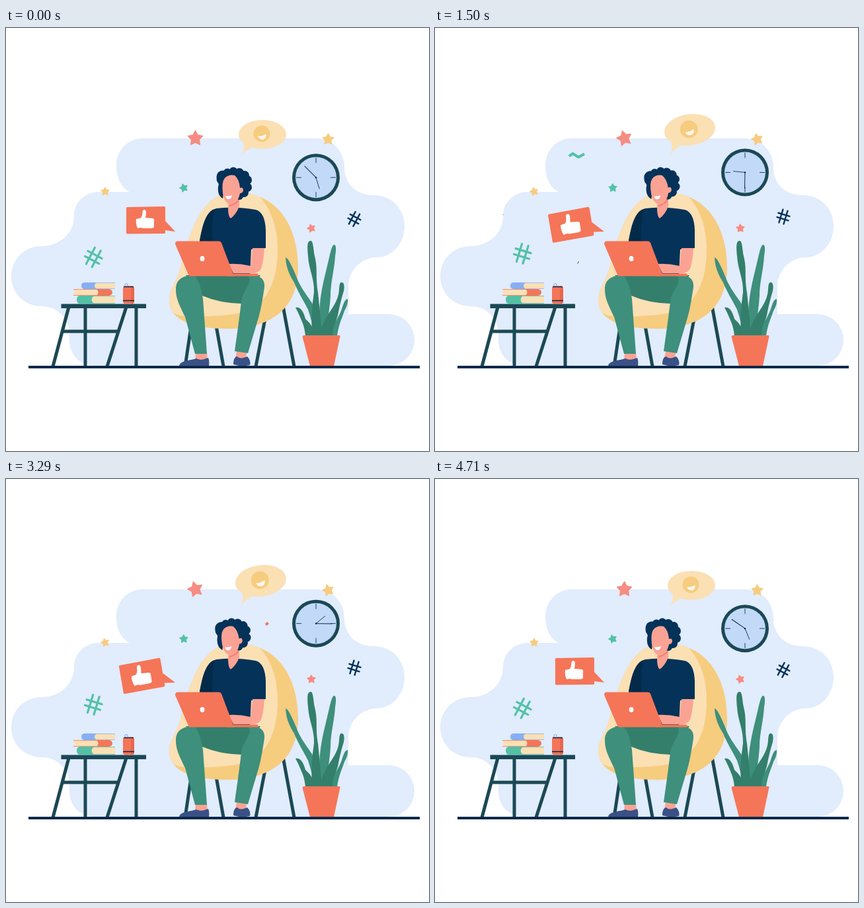
An HTML page with a canvas for the animation above (4.78 s loop, 640 by 640 pixels).

```html
<!DOCTYPE html>
<html lang="en">
<head>
<meta charset="utf-8">
<title>Working from an armchair</title>
<style>
html, body { margin: 0; width: 100%; height: 100%; overflow: hidden; background: #fff; }
canvas { display: block; width: 640px; height: 640px; }
</style>
</head>
<body>
<canvas id="stage" width="640" height="640"></canvas>
<script>
const ctx = document.getElementById('stage').getContext('2d');
const LOOP = 4780, TAU = Math.PI * 2, DEG = Math.PI / 180;
const C = {
  sky: '#e1ecfd', ground: '#08294a', steel: '#1b4855', red: '#f57558', pink: '#f68c82',
  cream: '#fbe0b4', gold: '#f6cc7f', teal: '#53c1a6', leaf: '#3e8f7c', moss: '#337f6b',
  navy: '#053259', ink: '#032a49', skin: '#faa394', shoe: '#3a5187', blue: '#87aff2',
  glass: '#c2d9f8', white: '#fff'
};

function fill(d, color) {
  ctx.fillStyle = color;
  ctx.fill(new Path2D(d));
}
function line(d, color, width, cap = 'butt') {
  ctx.strokeStyle = color;
  ctx.lineWidth = width;
  ctx.lineCap = cap;
  ctx.lineJoin = 'round';
  ctx.stroke(new Path2D(d));
}
function oval(x, y, rx, ry, color) {
  ctx.fillStyle = color;
  ctx.beginPath();
  ctx.ellipse(x, y, rx, ry, 0, 0, TAU);
  ctx.fill();
}
// Draws around (x, y) turned by deg and scaled; the origin stays at that pivot.
function at(x, y, deg, scale, draw) {
  ctx.save();
  ctx.translate(x, y);
  ctx.rotate(deg * DEG);
  ctx.scale(scale, scale);
  draw();
  ctx.restore();
}
function pivot(x, y, deg, scale, draw) {
  at(x, y, deg, scale, () => { ctx.translate(-x, -y); draw(); });
}

function backdrop() {
  fill('M207 167H468C494 167 512 186 512 211C512 236 530 253 556 253C584 253 603 274 603 300' +
    'C603 326 584 347 561 347C538 347 518 366 518 392V433H579A39 39 0 0 1 579 511H134' +
    'C112 511 96 494 96 473V463C96 440 78 421 54 421C28 421 8 401 8 376C8 350 28 330 54 330' +
    'C81 330 103 311 103 284C103 264 120 248 140 248H187C175 242 167 228 167 209' +
    'C167 185 184 167 207 167Z', C.sky);
}

function table() {
  line('M95 422L71 512M120 422V512M182 422L153 512M197 422V512M85 459H169', C.steel, 5);
  fill('M83.500 417.500H212V424H83.500Z', C.steel);
}

function books() {
  fill('M135 386H165V394H135Q132 390 135 386Z', C.cream);
  fill('M118 385H137Q131 390 137 395H118Q114 394 114 390Q114 386 118 385Z', C.blue);
  fill('M102 396H140V404H102Q105 400 102 396Z', C.cream);
  fill('M137 395H156Q161 396 161 400Q161 404 156 405H137Q142 400 137 395Z', C.red);
  fill('M131 406H165V416H131Q128 411 131 406Z', C.cream);
  fill('M111 405H133Q126 411 133 417H111Q107 416 107 411Q107 406 111 405Z', C.teal);
  line('M135 385.500H165M135 394.500H165', C.blue, .8);
  line('M102 395.500H140M102 404.500H140', C.red, .8);
  line('M131 405.500H165M131 416.500H165', C.teal, .8);
}

function can() {
  line('M180 390V388Q182 385 184 388V390', C.blue, 1.2);
  fill('M179 390.500H192L194 393V415L192 417.500H179L177 415V393Z', C.red);
  fill('M189 391H192L194 393V415L192 417H189Z', '#e9664c');
  line('M178 391.500H193M177 412.500H194', C.ground, 1.4);
}

function chair() {
  const shell = 'M345 249C412 247 442 302 442 362C442 425 400 455 335 455' +
    'C285 455 247 443 247 412C247 395 258 385 264 363C277 315 293 249 345 249Z';
  line('M281 445L271 512M317 445L329 512M392 440L378 512M419 420L436 512', C.steel, 5);
  fill(shell, C.gold);
  ctx.save();
  ctx.clip(new Path2D(shell));
  fill('M240 240H368Q380 250 380 252C400 270 411 300 411 335C411 390 390 425 350 432' +
    'C320 437 285 437 262 435L240 425Z', C.cream);
  ctx.restore();
}

function legs() {
  fill('M287 491H304L305 504H286Z', C.skin);
  fill('M349 488L364 490L363 502H347Z', C.skin);
  fill('M262 512C262 503 280 503 288 500C296 504 302 500 306 499Q308 504 307 511.500Z', C.shoe);
  fill('M344 509C344 500 347 497 350 497C355 502 361 498 365 497Q371 503 369 510L357 512Z', C.shoe);
  fill('M272 374H385L356 417Q322 416 297 405Z', C.moss);
  fill('M257 395C257 380 268 374 285 374C292 382 296 395 298 410L304 493H286L271 437' +
    'C261 417 257 408 257 395Z', C.leaf);
  fill('M366 374C385 373 392 380 391 392C388 412 385 430 380 445L366 492L346 489' +
    'C350 460 353 440 356 414C358 396 375 386 366 374Z', C.leaf);
}

function torso() {
  fill('M318 273Q346 269 378 275Q392 279 393 306V333L371 335L369 373H312L306 322H293' +
    'C297 301 301 278 318 273Z', C.navy);
  fill('M316 274C302 277 297 302 293 323H312Q311 292 316 274Z', C.ink);
  fill('M373 333H391Q390 352 386 364Q382 372 370 371H344L337 357Q353 356 370 360Z', C.skin);
  fill('M337 258H353V270Q348 282 340 288Q336 285 336 273Z', C.skin);
}

function laptop() {
  fill('M334 371.500H380Q382 372 382 375.500H334Z', C.red);
  fill('M259 322.500H322Q325 322.500 326 325L345 375.500H277L256 327Q256 323 259 322.500Z', C.red);
  oval(297, 349, 3.4, 4, C.white);
}

function head() {
  const curls = [[328, 225, 9.5], [335, 219, 6.5], [344, 217, 6.5], [353, 219, 7], [361, 223, 7],
    [365, 230, 7], [365, 241, 7], [360, 249, 7], [353, 254, 6], [349, 233, 14]];
  for (const [x, y, r] of curls) oval(x, y, r, r, C.navy);
  fill('M319 225C317 235 324 233 321 240C320 250 323 255 328 258L333 225Z', C.navy);
  line('M338 269Q346 267 352 261', '#f57f6e', 2);
  fill('M331 227Q337 221 346 223Q353 229 354 242Q359 240 359 246Q358 250 354 250' +
    'Q351 265 340 267Q330 265 328 250Q326 233 331 227Z', C.skin);
  fill('M332 254Q337 255 342 253Q341 259 336 259Q333 258 332 254Z', C.white);
}

function plant() {
  fill('M438 423C443 432 446 440 449 447Q452 455 453 466H467C465 450 458 445 453 440' +
    'C450 428 445 421 438 423Z', C.moss);
  fill('M423 347C424 365 430 375 436 385C442 400 450 412 457 426Q464 446 466 466H473' +
    'C472 445 470 430 463 416C452 400 444 390 438 373C433 362 428 349 423 347Z', C.leaf);
  fill('M496 328C492 330 490 345 486 360C480 385 476 400 474 430V466H486' +
    'C486 440 490 425 491 405C491 385 497 365 498 345Q501 327 496 328Z', C.leaf);
  fill('M461 322C455 322 456 332 457 345C458 365 467 380 466 400Q461 432 463 466H478' +
    'C476 440 474 420 472 400C468 375 472 365 467 345C465 335 465 322 461 322Z', C.moss);
  fill('M509 385C503 383 505 395 503 403C500 418 488 430 481 445Q476 455 476 466H496' +
    'Q497 448 502 435C505 418 508 408 511 398Q513 387 509 385Z', C.moss);
  fill('M517 410C512 410 510 420 507 428C503 438 497 445 495 455L494 466H501' +
    'C503 450 508 440 512 428Q518 418 517 410Z', C.leaf);
  fill('M450 465H505Q506 466 505 469L496 511.500H460L449 469Q448 466 450 465Z', C.red);
}

function clock(y, turn) {
  at(469, y, 0, 1, () => {
    oval(0, 0, 36, 36, C.steel);
    oval(0, 0, 31, 31, C.glass);
    line('M0 -30V-22M0 30V22M-30 0H-22M30 0H22', C.steel, 1);
    oval(0, 0, 1.2, 1.2, C.ground);
    at(0, 0, 315 + 720 * turn, 1, () => line('M0 0V-24.500', C.ground, 1));
    at(0, 0, 163 + 360 * turn, 1, () => line('M0 0V-18', C.ground, .8));
  });
}

function likeBubble() {
  fill('M183.500 271L239.500 270Q241 270 241 272V292L256 308L241 306V309.500Q241 311 239.500 311' +
    'L184 311.500Q182 311.500 182 310V272.500Q182 271 183.500 271Z', C.red);
  fill('M197 289Q200 288 203 288C207 285 206 279 207 276Q211 273 212 278Q212 283 211 287' +
    'L222 288Q225 289 224 292V301Q223 303 220 303H207L204 302L199 303Q196 296 197 289Z', C.white);
}

function smileBubble() {
  oval(388, 161, 36, 22, C.cream);
  fill('M360 174Q361 185 355 194Q361 185 373 181Z', C.cream);
  oval(387, 160, 12.5, 12.5, C.gold);
  fill('M381 163.500Q388 164 393.500 160.500C395 170.500 383 171 381 163.500Z', '#fdf6ec');
}

function star(x, y, r, deg, color) {
  at(x, y, deg, 1, () => {
    ctx.beginPath();
    for (let i = 0; i < 10; i++) {
      const d = (i % 2 ? .52 : 1) * (r - 1), a = i * TAU / 10;
      ctx.lineTo(d * Math.sin(a), -d * Math.cos(a));
    }
    ctx.closePath();
    ctx.fillStyle = ctx.strokeStyle = color;
    ctx.lineWidth = 1.6;
    ctx.lineJoin = 'round';
    ctx.fill();
    ctx.stroke();
  });
}

function hash(x, y, deg, scale, color) {
  at(x, y, deg, scale, () =>
    line('M-5 -14V14M5 -14V14M-12 -4.500H12M-12 4.500H12', color, 3.2, 'round'));
}

const ease = p => { p = Math.min(1, Math.max(0, p)); return p * p * (3 - 2 * p); };

// A stroke that grows from its first point until mid, then is wiped the same way.
function flourish(points, color, width, t, mid, span) {
  const from = ease((t - mid) / span), to = ease((t - mid + span) / span);
  if (to - from < .002) return;
  let length = 0;
  ctx.beginPath();
  points.forEach(([x, y], i) => {
    ctx.lineTo(x, y);
    if (i) length += Math.hypot(x - points[i - 1][0], y - points[i - 1][1]);
  });
  ctx.save();
  ctx.setLineDash([(to - from) * length, 2 * length]);
  ctx.lineDashOffset = -from * length;
  ctx.strokeStyle = color;
  ctx.lineWidth = width;
  ctx.lineCap = 'butt';
  ctx.lineJoin = 'round';
  ctx.stroke();
  ctx.restore();
}

const spiral = Array.from({ length: 61 }, (_, i) => {
  const u = i / 60, a = (450 * u - 305) * DEG, r = 2 + 7 * Math.pow(u, .8);
  return [102.3 + r * Math.cos(a), 280.3 + r * Math.sin(a)];
});

function flourishes(t) {
  flourish([[202, 194.5], [208.5, 190], [217, 195.5], [226, 190.5]], C.teal, 4, t, 1430, 640);
  flourish([[217, 355], [210, 350], [203.5, 354.5], [197, 349.5], [190, 354.5]],
    C.navy, 4, t, 2140, 700);
  flourish(spiral, C.red, 1.4, t, 2140, 700);
  flourish([[393, 220.5], [399, 216], [407, 221], [416, 216.5]], C.red, 4, t, 3790, 680);
}

function render(t) {
  const turn = t / LOOP;
  const drift = Math.cos(TAU * turn);
  const swing = (1 - Math.cos(2 * TAU * turn)) / 2;

  ctx.fillStyle = C.white;
  ctx.fillRect(0, 0, 640, 640);
  backdrop();
  table();
  books();
  can();
  chair();
  legs();
  torso();
  pivot(343, 268, -3.5 * swing, 1, head);
  laptop();
  plant();
  fill('M34 511H626V515H34Z', C.ground);

  clock(220.7 + 5.5 * drift, turn);
  pivot(256, 308, -11.4 * swing, 1 + .09 * swing, likeBubble);
  pivot(355, 194, -9 * swing, 1 + .09 * swing, smileBubble);

  const lean = -18 * swing;
  star(286.5, 167, 12.5, lean, C.pink);
  star(487.5, 168.5, 9.5, lean, C.gold);
  star(150, 247.5, 7, lean, C.gold);
  star(269, 242, 7, -18 - lean, C.teal);
  star(462, 303, 7, -18 - lean, C.pink);

  const tilt = 20 + 8 * drift;
  hash(132.3, 343 + 4 * drift, tilt, 1, C.teal);
  hash(527, 286.500 + 2.500 * drift, tilt, .74, C.navy);
  flourishes(t);
}

const start = performance.now();
function tick() {
  render((performance.now() - start) % LOOP);
  requestAnimationFrame(tick);
}
tick();
</script>
</body>
</html>
```
